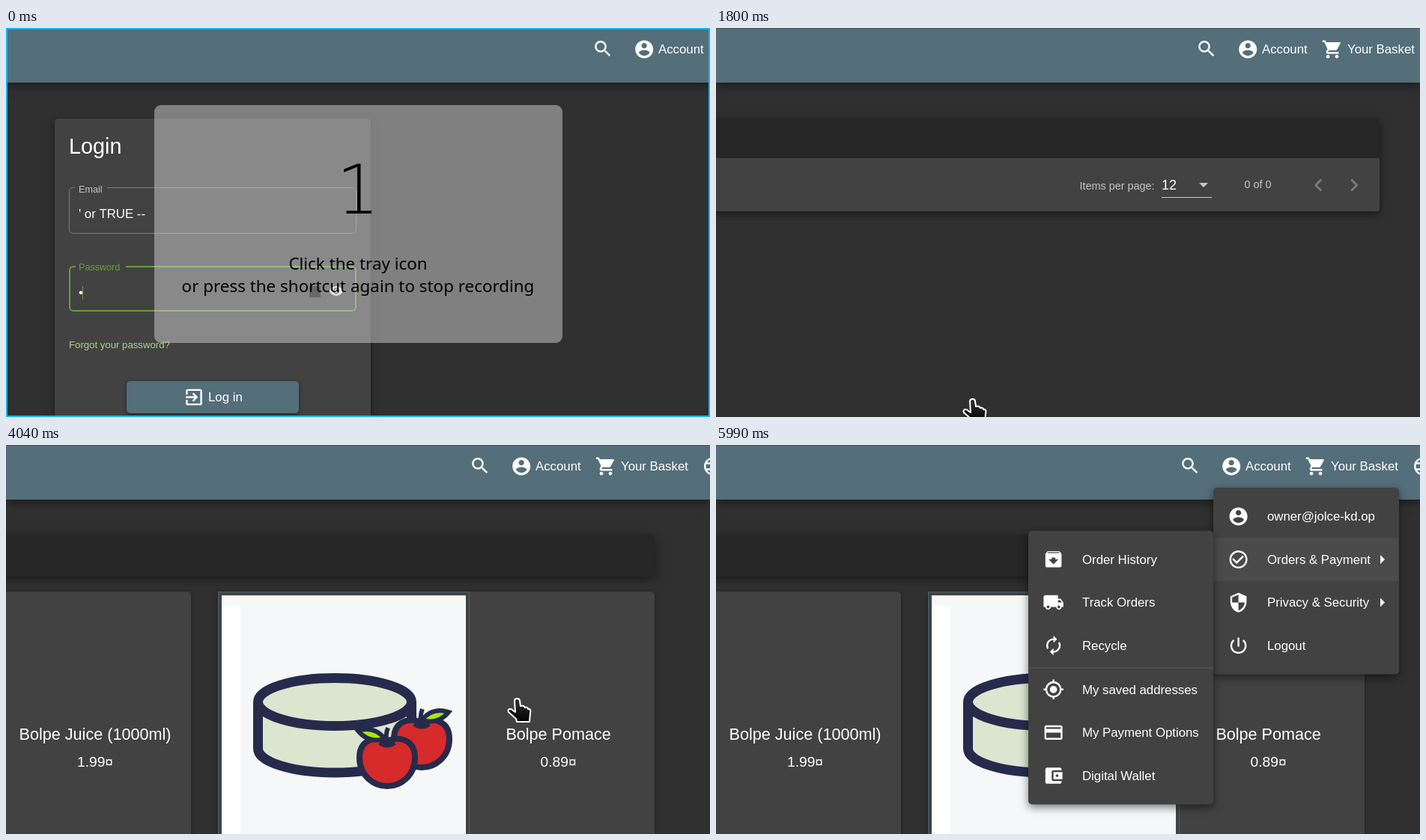
These frames come from a looping animation (940x520 px, 7.93 s). An HTML page with a canvas:

```html
<!DOCTYPE html>
<html lang="en">
<head>
<meta charset="utf-8">
<title>Shop login</title>
<style>
html, body { margin: 0; width: 100%; height: 100%; overflow: hidden; background: #303030; }
canvas { display: block; width: 940px; height: 520px; }
</style>
</head>
<body>
<canvas id="stage" width="940" height="520"></canvas>
<script>
const LOOP = 7930;
const ctx = document.getElementById('stage').getContext('2d');
const SANS = '"Liberation Sans", Arial, sans-serif';
const PRIMARY = '#546e7a', PANEL = '#424242', NAVY = '#262b4c', GREEN = '#689f38';

// Icons are drawn on a 24 x 24 grid.
const icons = {
  search: 'M15.5 14h-.79l-.28-.27C15.41 12.59 16 11.11 16 9.5 16 5.91 13.09 3 9.5 3S3 5.91 3 9.5 5.91 16 9.5 16c1.61 0 3.09-.59 4.23-1.57l.27.28v.79l5 4.99L20.49 19l-4.99-5zm-6 0C7.01 14 5 11.99 5 9.5S7.01 5 9.5 5 14 7.01 14 9.5 11.99 14 9.5 14z',
  account: 'M12 2C6.48 2 2 6.48 2 12s4.48 10 10 10 10-4.48 10-10S17.52 2 12 2zm0 3c1.66 0 3 1.34 3 3s-1.34 3-3 3-3-1.34-3-3 1.34-3 3-3zm0 14.2c-2.5 0-4.71-1.28-6-3.22.03-1.99 4-3.08 6-3.08 1.99 0 5.97 1.09 6 3.08-1.29 1.94-3.5 3.22-6 3.22z',
  cart: 'M7 18c-1.1 0-1.99.9-1.99 2S5.9 22 7 22s2-.9 2-2-.9-2-2-2zM1 2v2h2l3.6 7.59-1.35 2.45c-.16.28-.25.61-.25.96 0 1.1.9 2 2 2h12v-2H7.42c-.14 0-.25-.11-.25-.25l.03-.12.9-1.63h7.45c.75 0 1.41-.41 1.75-1.03l3.58-6.49c.08-.14.12-.31.12-.48 0-.55-.45-1-1-1H5.21l-.94-2H1zm16 16c-1.1 0-1.99.9-1.99 2s.89 2 1.99 2 2-.9 2-2-.9-2-2-2z',
  enter: 'M10.09 15.59L11.5 17l5-5-5-5-1.41 1.41L12.67 11H3v2h9.67l-2.58 2.59zM19 3H5c-1.11 0-2 .9-2 2v4h2V5h14v14H5v-4H3v4c0 1.1.89 2 2 2h14c1.1 0 2-.9 2-2V5c0-1.1-.9-2-2-2z',
  eye: 'M12 4.5C7 4.5 2.73 7.61 1 12c1.73 4.39 6 7.5 11 7.5s9.27-3.11 11-7.5c-1.73-4.39-6-7.5-11-7.5zM12 17c-2.76 0-5-2.24-5-5s2.24-5 5-5 5 2.24 5 5-2.24 5-5 5zm0-8c-1.66 0-3 1.34-3 3s1.34 3 3 3 3-1.34 3-3-1.34-3-3-3z',
  check: 'M16.59 7.58L10 14.17l-3.59-3.58L5 12l5 5 8-8zM12 2C6.48 2 2 6.48 2 12s4.48 10 10 10 10-4.48 10-10S17.52 2 12 2zm0 18c-4.42 0-8-3.58-8-8s3.58-8 8-8 8 3.58 8 8-3.58 8-8 8z',
  shield: 'M12 1L3 5v6c0 5.55 3.84 10.74 9 12 5.16-1.26 9-6.45 9-12V5l-9-4zm0 10.99h7c-.53 4.12-3.28 7.79-7 8.94V12H5V6.3l7-3.11v8.8z',
  power: 'M13 3h-2v10h2V3zm4.83 2.17l-1.42 1.42C17.99 7.86 19 9.81 19 12c0 3.87-3.13 7-7 7s-7-3.13-7-7c0-2.19 1.01-4.14 2.58-5.42L6.17 5.17C4.23 6.82 3 9.26 3 12c0 4.97 4.03 9 9 9s9-4.03 9-9c0-2.74-1.23-5.18-3.17-6.83z',
  archive: 'M20.54 5.23l-1.39-1.68C18.88 3.21 18.47 3 18 3H6c-.47 0-.88.21-1.16.55L3.46 5.23C3.17 5.57 3 6.02 3 6.5V19c0 1.1.9 2 2 2h14c1.1 0 2-.9 2-2V6.5c0-.48-.17-.93-.46-1.27zM12 17.5L6.5 12H10v-2h4v2h3.5L12 17.5zM5.12 5l.81-1h12l.94 1H5.12z',
  truck: 'M20 8h-3V4H3c-1.1 0-2 .9-2 2v11h2c0 1.66 1.34 3 3 3s3-1.34 3-3h6c0 1.66 1.34 3 3 3s3-1.34 3-3h2v-5l-3-4zM6 18.5c-.83 0-1.5-.67-1.5-1.5s.67-1.5 1.5-1.5 1.5.67 1.5 1.5-.67 1.5-1.5 1.5zm13.5-9l1.96 2.5H17V9.5h2.5zm-1.5 9c-.83 0-1.5-.67-1.5-1.5s.67-1.5 1.5-1.5 1.5.67 1.5 1.5-.67 1.5-1.5 1.5z',
  recycle: 'M12 6v3l4-4-4-4v3c-4.42 0-8 3.58-8 8 0 1.57.46 3.03 1.24 4.26L6.7 14.8c-.45-.83-.7-1.79-.7-2.8 0-3.31 2.69-6 6-6zm6.76 1.74L17.3 9.2c.44.84.7 1.79.7 2.8 0 3.31-2.69 6-6 6v-3l-4 4 4 4v-3c4.42 0 8-3.58 8-8 0-1.57-.46-3.03-1.24-4.26z',
  locate: 'M12 8c-2.21 0-4 1.79-4 4s1.79 4 4 4 4-1.79 4-4-1.79-4-4-4zm8.94 3c-.46-4.17-3.77-7.48-7.94-7.94V1h-2v2.06C6.83 3.52 3.52 6.83 3.06 11H1v2h2.06c.46 4.17 3.77 7.48 7.94 7.94V23h2v-2.06c4.17-.46 7.48-3.77 7.94-7.94H23v-2h-2.06zM12 19c-3.87 0-7-3.13-7-7s3.13-7 7-7 7 3.13 7 7-3.13 7-7 7z',
  card: 'M20 4H4c-1.11 0-1.99.89-1.99 2L2 18c0 1.11.89 2 2 2h16c1.11 0 2-.89 2-2V6c0-1.11-.89-2-2-2zm0 14H4v-6h16v6zm0-10H4V6h16v2z',
  wallet: 'M21 18v1c0 1.1-.9 2-2 2H5c-1.11 0-2-.9-2-2V5c0-1.1.89-2 2-2h14c1.1 0 2 .9 2 2v1h-9c-1.11 0-2 .9-2 2v8c0 1.1.89 2 2 2h9zm-9-2h10V8H12v8zm4-2.5c-.83 0-1.5-.67-1.5-1.5s.67-1.5 1.5-1.5 1.5.67 1.5 1.5-.67 1.5-1.5 1.5z',
  left: 'M15.41 7.41L14 6l-6 6 6 6 1.41-1.41L10.83 12z',
  right: 'M10 6L8.59 7.41 13.17 12l-4.58 4.59L10 18l6-6z'
};
for (const name in icons) icons[name] = new Path2D(icons[name]);

const HAND = new Path2D('M-5 4C-5 0 2 0 2 4L3 11C6 10 8 11 9 13C11 12 13 13 13 15C16 14 17 17 16 20L15 32H-2L-3 28L-13 19C-15 15-10 13-7 17L-4 19Z');
const ARROW = new Path2D('M0 0V24L5 26L13 25L18 17Z');
const APPLE = new Path2D('M0-24C-10-30-37-30-37-2C-37 22-18 36 0 36C18 36 37 22 37-2C37-30 10-30 0-24Z');
const LEAF = new Path2D('M-18-5Q4-12 18 6Q-4 12-18-5Z');

const clamp = v => Math.min(1, Math.max(0, v));
const phase = (t, start, length) => clamp((t - start) / length);
const easeOut = p => 1 - (1 - p) ** 2.7;
const easeInOut = p => p * p * (3 - 2 * p);
const mix = (a, b, p) => a + (b - a) * p;

function text(str, x, y, size = 16.8, color = '#fff', align = 'left', font = SANS) {
  ctx.font = `${size}px ${font}`;
  ctx.fillStyle = color;
  ctx.textAlign = align;
  ctx.fillText(str, x, y);
}

function rect(x, y, w, h, color) {
  ctx.fillStyle = color;
  ctx.fillRect(x, y, w, h);
}

function box(x, y, w, h, radius, color, shadow = 0, drop = 3) {
  ctx.save();
  if (shadow) {
    ctx.shadowColor = 'rgba(0,0,0,.5)';
    ctx.shadowBlur = shadow;
    ctx.shadowOffsetY = drop;
  }
  ctx.fillStyle = color;
  ctx.beginPath();
  ctx.roundRect(x, y, w, h, radius);
  ctx.fill();
  ctx.restore();
}

function outline(x, y, w, h, radius, color, width = 1) {
  ctx.strokeStyle = color;
  ctx.lineWidth = width;
  ctx.beginPath();
  ctx.roundRect(x + width / 2, y + width / 2, w - width, h - width, radius);
  ctx.stroke();
}

function icon(name, cx, cy, size = 28.8, color = '#fff') {
  ctx.save();
  ctx.translate(cx - size / 2, cy - size / 2);
  ctx.scale(size / 24, size / 24);
  ctx.fillStyle = color;
  ctx.fill(icons[name]);
  ctx.restore();
}

function triangle(color, ...points) {
  ctx.fillStyle = color;
  ctx.beginPath();
  for (const [x, y] of points) ctx.lineTo(x, y);
  ctx.fill();
}

function ripple(x, y, w, h, cx, cy, radius, alpha) {
  ctx.save();
  ctx.beginPath();
  ctx.roundRect(x, y, w, h, 5);
  ctx.clip();
  ctx.fillStyle = `rgba(255,255,255,${alpha})`;
  ctx.beginPath();
  ctx.arc(cx, cy, radius, 0, 7);
  ctx.fill();
  ctx.restore();
}

function header(t) {
  box(0, 0, 940, 73, 0, PRIMARY, 12, 3);
  rect(0, 0, 940, 1, '#46575f');
  const shift = t < 1800 ? 142 : t < 2550 ? 0 : -22;
  if (t >= 4770 && t < 4990) {
    const fade = 1 - phase(t, 4890, 100);
    ripple(664, 1, 113, 56, 721, 40, 70 * easeOut(phase(t, 4770, 225)), .13 * fade);
    rect(664, 48, 113, 9, `rgba(100,110,190,${.3 * fade})`);
  }
  icon('search', 655 + shift, 27.8);
  icon('account', 710.2 + shift, 28.5);
  text('Account', 729 + shift, 34);
  if (t < 1800) return;
  icon('cart', 823 + shift, 28.5);
  text('Your Basket', 843 + shift, 34);
  if (t < 2550) return;
  ctx.strokeStyle = '#fff';
  ctx.lineWidth = 2.4;
  ctx.beginPath();
  ctx.arc(944, 28.5, 10.8, 0, 7);
  ctx.moveTo(934, 24.5);
  ctx.lineTo(954, 24.5);
  ctx.moveTo(934, 32.5);
  ctx.lineTo(954, 32.5);
  ctx.stroke();
}

function loginPage(t) {
  box(65, 121, 422, 420, 5, PANEL, 10);
  text('Login', 84, 168, 28.8);

  outline(84, 213, 384, 62, 5, '#7b7b7b');
  rect(92, 212, 43, 3, PANEL);
  text('Email', 97, 220, 12.6, '#c6c6c6');
  text("' or TRUE --", 97, 254);

  const focused = t < 980;
  outline(84, 318, 384, 61, 5, focused ? GREEN : '#7b7b7b', focused ? 2 : 1);
  rect(93, 317, 67, 4, PANEL);
  text('Password', 97, 324, 12.6, focused ? GREEN : '#c6c6c6');
  text('•', 97, 359);
  if (t < 40 || (t >= 550 && focused)) rect(102, 345, 1, 18, GREEN);
  rect(405, 345, 15, 15, '#000');
  icon('eye', 441, 351.5, 20);

  text('Forgot your password?', 84, 428, 13.2, '#aed581');
  box(161, 472, 230, 43, 5, PRIMARY, 5, 2);
  if (t >= 980 && t < 1370) {
    ripple(161, 472, 230, 43, 343, 497, 184 * easeOut(phase(t, 980, 225)), .1 * (1 - phase(t, 1205, 160)));
  }
  icon('enter', 251, 493.5);
  text('Log in', 270, 499);
}

function emptyResults() {
  box(-20, 121, 906, 124, 4, PANEL, 12);
  box(-20, 121, 906, 53, [4, 4, 0, 0], '#262626');
  text('Items per page:', 485.5, 216, 14.4, '#c6c6c6');
  text('12', 595, 216, 18);
  rect(595, 226, 67, 1, '#c6c6c6');
  triangle('#c6c6c6', [645, 207], [657, 207], [651, 213]);
  text('0 of 0', 705.5, 214, 14.4, '#c6c6c6');
  icon('left', 804.4, 210, 33.6, '#7b7b7b');
  icon('right', 852, 210, 33.6, '#7b7b7b');
}

function apple(x, y, leafX, leafY, flip) {
  ctx.save();
  ctx.translate(x, y);
  ctx.fillStyle = '#d72a2a';
  ctx.lineWidth = 8;
  ctx.fill(APPLE);
  ctx.stroke(APPLE);
  ctx.lineWidth = 6;
  ctx.beginPath();
  ctx.moveTo(-10, -22);
  ctx.quadraticCurveTo(0, -15, 10, -22);
  ctx.moveTo(0, -22);
  ctx.quadraticCurveTo(-3, -32, 1, -42);
  ctx.stroke();
  ctx.translate(leafX, leafY);
  ctx.scale(flip, 1);
  ctx.fillStyle = '#a6e80c';
  ctx.fill(LEAF);
  ctx.stroke(LEAF);
  ctx.restore();
}

function productImage() {
  outline(283, 196, 336, 400, 0, '#466572');
  rect(288, 201, 326, 360, '#f5f7f8');
  rect(288, 215, 25, 360, '#fff');
  ctx.strokeStyle = NAVY;
  ctx.fillStyle = '#dce5cf';
  ctx.lineWidth = 13;
  ctx.beginPath();
  ctx.moveTo(541.5, 343);
  ctx.lineTo(541.5, 406);
  ctx.ellipse(439, 406, 102.5, 32, 0, 0, Math.PI);
  ctx.lineTo(336.5, 343);
  ctx.fill();
  ctx.stroke();
  ctx.beginPath();
  ctx.ellipse(439, 343.5, 102.5, 32, 0, 0, 7);
  ctx.fill();
  ctx.stroke();
  apple(555, 395, 18, -33, -1);
  apple(509, 420, -21, -33, 1);
}

function products(loaded) {
  box(-20, 121, 886, 55, 4, '#262626', 14);
  box(-20, 196, 267, 400, 5, PANEL, 4, 1);
  box(283, 196, 583, 400, 5, PANEL, 4, 1);
  const dy = loaded ? 159 : 0;
  const label = (name, price, x) => {
    text(name, x, 235 + dy, 21.6, '#fff', 'center');
    text(price, x, 271 + dy, 19.2, '#fff', 'center');
  };
  label('Bolpe Juice (1000ml)', '1.99¤', 119);
  label('Bolpe Pomace', '0.89¤', 737.6);
  if (loaded) return productImage();
  outline(283, 223, 336, 10, [0, 0, 4, 4], PRIMARY);
  for (const x of [-116, 503]) {
    box(x, 278, 143, 44, 5, PRIMARY, 5, 2);
    text('Add to Basket', x + 71.5, 306, 16.8, '#fff', 'center');
  }
}

// A menu grows from its top left corner while it fades in.
function menu(t, start, x, y, w, h, drawRows) {
  if (t < start) return;
  const p = easeOut(phase(t, start, 120));
  ctx.save();
  ctx.globalAlpha = p;
  ctx.translate(x, y);
  ctx.scale(mix(.8, 1, p), mix(.8, 1, p));
  box(0, 0, w, h, 5, PANEL, 12, 4);
  drawRows();
  ctx.restore();
}

function menuRow(name, str, cy, arrow) {
  icon(name, 33.6, cy);
  text(str, 72, cy + 5.8);
  if (arrow) triangle('#fff', [223, cy - 6], [229, cy], [223, cy + 6]);
}

function menus(t) {
  menu(t, 4822, 664, 57, 248, 249.6, () => {
    if (t >= 5480) rect(0, 67, 248, 58, '#4b4b4b');
    menuRow('account', 'owner@jolce-kd.op', 38.4);
    menuRow('check', 'Orders & Payment', 96, true);
    menuRow('shield', 'Privacy & Security', 153.6, true);
    menuRow('power', 'Logout', 211.2);
  });
  menu(t, 5866, 417, 114.4, 247, 366, () => {
    menuRow('archive', 'Order History', 38.4);
    menuRow('truck', 'Track Orders', 96);
    menuRow('recycle', 'Recycle', 153.6);
    rect(0, 183, 247, 1, '#5a5a5a');
    menuRow('locate', 'My saved addresses', 212.4);
    menuRow('card', 'My Payment Options', 270);
    menuRow('wallet', 'Digital Wallet', 327.6);
  });
}

function pointer(shape, x, y) {
  ctx.save();
  ctx.translate(x, y);
  const shade = ctx.createLinearGradient(0, 0, 0, 32);
  shade.addColorStop(0, '#333');
  shade.addColorStop(1, '#000');
  ctx.fillStyle = shade;
  ctx.strokeStyle = '#fff';
  ctx.lineWidth = 2;
  ctx.lineJoin = 'round';
  ctx.fill(shape);
  ctx.stroke(shape);
  ctx.restore();
}

function mouse(t) {
  if (t >= 550 && t < 3290) {
    const enter = easeOut(phase(t, 530, 270));
    pointer(HAND, mix(347, 344, enter), mix(522, 495, enter) + 26 * phase(t, 3230, 60));
  } else if (t >= 4040 && t < 5910) {
    const up = easeInOut(phase(t, 4040, 680));
    const down = easeInOut(phase(t, 5100, 420));
    const x = mix(mix(684, 720, up), 780, down);
    const y = mix(mix(338, 37, up), 150, down);
    pointer(t < 4822 || y > 60 ? HAND : ARROW, x, y);
  }
  if (t >= 4790 && t < 4980) {
    ctx.strokeStyle = '#4da6ee';
    ctx.lineWidth = 3;
    ctx.beginPath();
    ctx.arc(722, 38, 16 * phase(t, 4770, 115), 0, 7);
    ctx.stroke();
    pointer(t < 4822 ? HAND : ARROW, 720, 37);
  }
}

function recorderNotice() {
  box(198, 103, 545, 318, 9, 'rgba(208,208,208,.5)');
  ctx.textAlign = 'center';
  ctx.fillStyle = '#000';
  ctx.font = '200 90px "DejaVu Sans", sans-serif';
  ctx.fillText('1', 470, 248);
  const notice = '"Noto Sans", sans-serif';
  text('Click the tray icon', 470, 323, 22.4, '#000', 'center', notice);
  text('or press the shortcut again to stop recording', 470, 353, 22.4, '#000', 'center', notice);
  outline(0, 0, 940, 520, 0, '#16b1f3', 2);
}

function draw(t) {
  rect(0, 0, 940, 520, '#303030');
  if (t < 1800) loginPage(t);
  else if (t < 2550) emptyResults();
  else products(t >= 2600);
  header(t);
  menus(t);
  mouse(t);
  if (t < 40) recorderNotice();
}

const begin = performance.now();
function tick() {
  draw((performance.now() - begin) % LOOP);
  requestAnimationFrame(tick);
}
tick();
</script>
</body>
</html>
```
